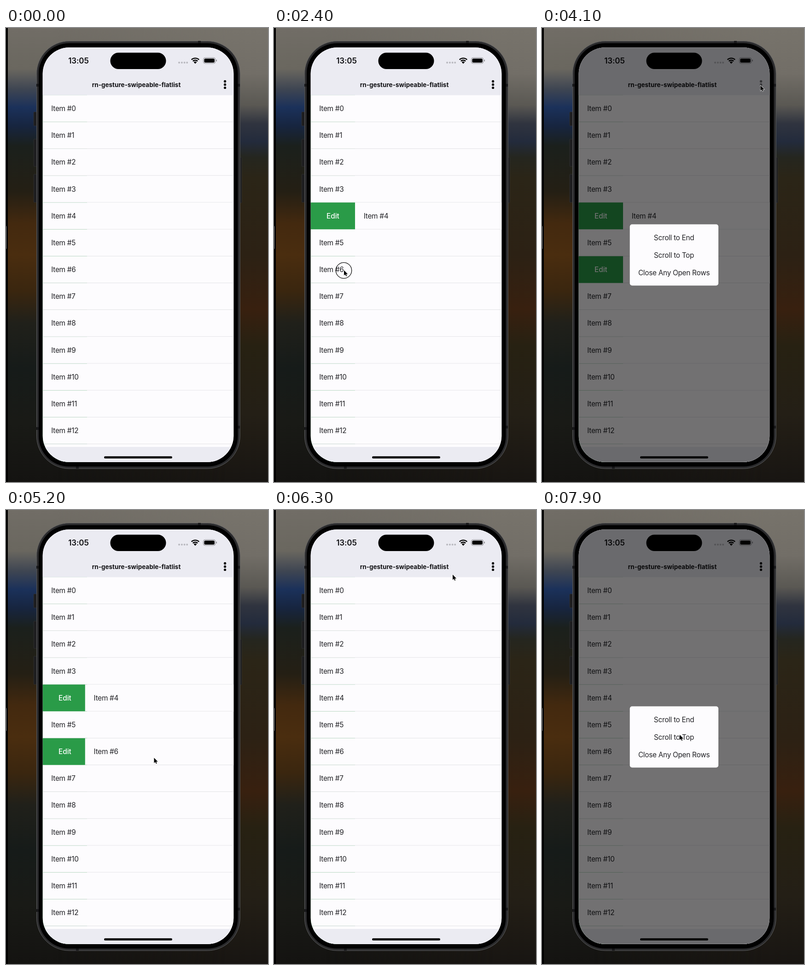
These frames come from a looping animation (569 by 984 pixels, 8 s). An HTML page:

```html
<!DOCTYPE html>
<html lang="en">
<head>
<meta charset="utf-8">
<title>Swipeable list</title>
<style>
  html, body { margin: 0; width: 100%; height: 100%; overflow: hidden; background: #000; }
  svg { display: block; width: 100vw; height: 100vh; }
  text { font: 15.4px Inter, Roboto, sans-serif; letter-spacing: -.3px; fill: #222226; }
  .mid { text-anchor: middle; }
  .title { font-size: 13.5px; font-weight: 700; letter-spacing: 0; fill: #111114; }
  .clock { font-size: 17px; font-weight: 600; letter-spacing: -.1px; fill: #111114; }
  .edit { font-weight: 500; letter-spacing: -.1px; fill: #fff; }
</style>
</head>
<body>
<svg id="stage" viewBox="0 0 569 984" preserveAspectRatio="none"></svg>
<script>
const LOOP = 8000, STEP = 100;
const ROW_TOP = 145.6, ROW_HEIGHT = 58.17, OPEN = 96.5;
const stage = document.getElementById('stage');

const gradient = (id, stops, across = false) =>
  `<linearGradient id="${id}" x2="${across ? 1 : 0}" y2="${across ? 0 : 1}">` +
  stops.map(([at, color]) => `<stop offset="${at}" stop-color="${color}"/>`).join('') +
  '</linearGradient>';
const rect = (x, y, w, h, fill, r = 0, extra = '') =>
  `<rect x="${x}" y="${y}" width="${w}" height="${h}" rx="${r}" fill="${fill}" ${extra}/>`;
const dot = (x, y, r, fill) => `<circle cx="${x}" cy="${y}" r="${r}" fill="${fill}"/>`;
const label = (x, y, text, style = '') => `<text x="${x}" y="${y}" class="${style}">${text}</text>`;
const arc = r => `<path d="M${411 - r * .7} ${77 - r * .7}A${r} ${r} 0 0 1 ${411 + r * .7} ${77 - r * .7}"
  fill="none" stroke="#000" stroke-width="2.4"/>`;

const backdrop = `
  <defs>
    ${gradient('left', [[0, '#716d66'], [.09, '#6a675f'], [.135, '#3e4552'], [.175, '#1b315a'],
      [.215, '#172540'], [.26, '#1b201c'], [.36, '#241f14'], [.43, '#43290f'], [.5, '#4a2d0f'],
      [.58, '#3a260f'], [.65, '#20201a'], [.75, '#161b19'], [.87, '#191a16'], [1, '#141311']])}
    ${gradient('right', [[0, '#77736b'], [.1, '#726e67'], [.17, '#5a5853'], [.21, '#30343f'],
      [.25, '#232b3c'], [.285, '#25261f'], [.33, '#2b2517'], [.5, '#2c2114'], [.62, '#38200f'],
      [.7, '#272112'], [.85, '#241f16'], [1, '#181512']])}
    ${gradient('fade', [[.2, '#000'], [.85, '#fff']], true)}
    <mask id="blend">${rect(0, 0, 569, 984, 'url(#fade)')}</mask>
    <clipPath id="screen">${rect(79.7, 42.3, 414.6, 898.5, '#000', 57)}</clipPath>
  </defs>
  ${rect(0, 0, 569, 984, '#000')}
  ${rect(4, 0, 565, 984, 'url(#left)')}
  ${rect(4, 0, 565, 984, 'url(#right)', 0, 'mask="url(#blend)"')}
  ${rect(-2, 429, 3, 50, '#8a8a8a', 1.5)}`;

const sideButtons = [[60, 182, 30], [60, 241, 59], [60, 317, 61], [508, 280, 99]]
  .map(([x, y, h]) => rect(x, y, x < 99 ? 7 : 4, h, '#1d1d1f', 1.5, 'stroke="#39393b" stroke-width=".6"')).join('');
const antennas = [[417, 28, 6, 5], [152, 950, 6, 5], [66, 121, 5, 6], [66, 865, 5, 6], [503, 121, 5, 6], [503, 862, 5, 6]]
  .map(box => rect(...box, '#171719')).join('');
const phone = sideButtons +
  rect(66.5, 28.5, 441.7, 926.5, '#2a2a2c', 71, 'stroke="#5c5d5e"') + antennas +
  rect(71, 33, 432.5, 917.5, '#000', 66);

const row = i => {
  const y = ROW_TOP + i * ROW_HEIGHT;
  return rect(79.5, y, OPEN, ROW_HEIGHT, '#2a9b48') +
    label(127.8, y + 34.4, 'Edit', 'edit mid') +
    `<g class="row">${rect(79.5, y, 415, ROW_HEIGHT + .3, '#fdfcfe')}
      ${rect(79.5, y + 57.5, 415, 1, '#d7d7db')}${label(98.3, y + 34.4, 'Item #' + i)}</g>`;
};

const statusBar = label(157.5, 77, '13:05', 'clock mid') +
  rect(226.5, 53.5, 121, 35.5, '#000', 17.7) +
  [376, 381.9, 387.6, 393.2].map(x => dot(x, 75, 2, '#b9b9bf')).join('') +
  arc(11.8) + arc(7.4) + '<path d="M411 77.5L407.7 74A4.6 4.6 0 0 1 414.3 74Z"/>' +
  rect(428.5, 64.3, 26.3, 12.6, 'none', 4, 'stroke="#85858a"') +
  rect(430.4, 66.2, 22.5, 8.8, '#000', 2.5) +
  rect(456.3, 68.6, 1.6, 4, '#85858a', .8);

const app = `<g clip-path="url(#screen)">
  ${rect(79, 42, 416, 900, '#fdfcfe')}
  ${Array.from({ length: 14 }, (_, i) => row(i)).join('')}
  ${rect(79, 42, 416, 103.6, '#ebebf2')}
  ${statusBar}
  ${label(283, 127.5, 'rn-gesture-swipeable-flatlist', 'title mid')}
  <g id="menu">${[115.7, 122.7, 129.5].map(y => dot(475.6, y, 2.6, '#000')).join('')}</g>
  ${rect(79, 908, 416, 34, '#ebebf2')}
  ${rect(213, 928.3, 148, 4.8, '#000', 2.4)}
  <g id="dialog">
    ${rect(79, 42, 416, 900, 'rgba(0,0,0,.55)')}
    ${rect(190.7, 425.6, 192.4, 132.6, '#fdfcfe', 5)}
    ${['Scroll to End', 'Scroll to Top', 'Close Any Open Rows']
      .map((text, i) => label(286.6, 459.6 + i * 38, text, 'mid')).join('')}
  </g></g>`;

const pointer = `<g id="pointer">
  <circle id="ring" cx="-.5" cy=".5" r="17.2" fill="none" stroke="#111" stroke-width="1.3"/>
  <path d="M0 0V11.5L2.7 9.1 4.4 13 6.2 12.2 4.5 8.4H8.2Z" stroke="#fff" stroke-width="1.2" paint-order="stroke"/>
</g>`;

stage.innerHTML = backdrop + phone + app + pointer;
const [menu, dialog, cursor, ring] = ['menu', 'dialog', 'pointer', 'ring'].map(id => document.getElementById(id));
const rows = stage.querySelectorAll('.row');

// Pointer stops: time, x, y
const path = [
  [500, 330, 985], [1200, 140, 408], [1400, 140, 408], [1700, 268, 410], [1900, 268, 410],
  [2300, 152, 525], [2400, 152, 525], [2800, 270, 527], [3100, 270, 527],
  [3800, 474.5, 124.5], [4300, 474.5, 124.5], [4900, 321.5, 537], [5700, 321.5, 537],
  [6300, 388, 140], [6500, 474.5, 124.5], [7300, 474.5, 124.5], [7600, 440, 232], [7900, 299, 487],
];
const presses = [[1300, 1800], [2400, 2900], [3800, 4000], [5000, 5100], [6700, 6900]];
const dialogs = [[4100, 5100], [6900, LOOP]];

const within = (t, spans) => spans.some(([from, to]) => t >= from && t < to);
const ease = p => p < .5 ? 2 * p * p : 1 - 2 * (1 - p) ** 2;
const tween = (t, from, to) => ease(Math.min(1, Math.max(0, (t - from) / (to - from))));

function pointerAt(t) {
  const next = path.findIndex(stop => stop[0] > t);
  if (next < 0) return path[path.length - 1].slice(1);
  if (next === 0) return path[0].slice(1);
  const [t0, x0, y0] = path[next - 1], [t1, x1, y1] = path[next];
  const p = (t - t0) / (t1 - t0);
  return [x0 + (x1 - x0) * p, y0 + (y1 - y0) * p];
}

function menuOpacity(t) {
  if (within(t, [[3800, 4100], [6700, 6900]])) return .25;
  return within(t, [[4100, 4200], [6900, 7000]]) ? .5 : 1;
}

function draw(t) {
  const closing = 1 - tween(t, 5155, 5460);
  const slide = (i, from, to) =>
    rows[i].setAttribute('transform', `translate(${OPEN * tween(t, from, to) * closing})`);
  slide(4, 1400, 1750);
  slide(6, 2450, 2850);
  menu.setAttribute('opacity', menuOpacity(t));
  dialog.style.display = within(t, dialogs) ? '' : 'none';
  ring.style.display = within(t, presses) ? '' : 'none';
  cursor.style.display = t < 500 ? 'none' : '';
  cursor.setAttribute('transform', `translate(${pointerAt(t)})`);
}

const start = performance.now();
function tick() {
  const t = (performance.now() - start) % LOOP;
  draw(Math.floor(t / STEP) * STEP);
  requestAnimationFrame(tick);
}
tick();
</script>
</body>
</html>
```
